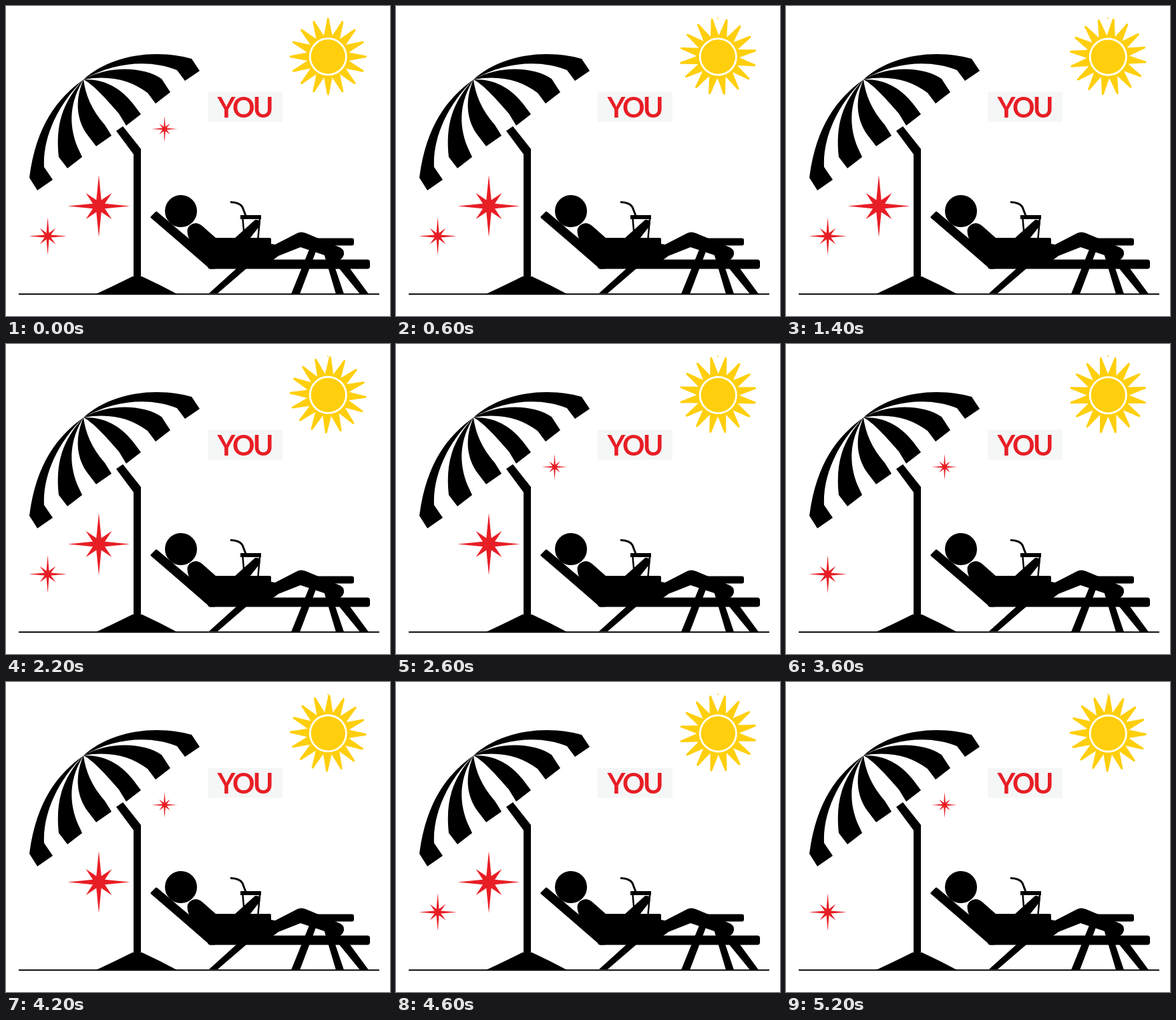
Animation, 575 px wide and 464 px high, one loop 5400 ms. Source, as an HTML page:

```html
<!DOCTYPE html>
<html lang="en">
<head>
<meta charset="utf-8">
<title>You on the beach</title>
<style>
html, body { margin: 0; width: 100%; height: 100%; overflow: hidden; background: #fff; }
svg { display: block; width: 575px; height: 464px; }
text { font: 700 41.5px Lato, sans-serif; letter-spacing: -2.7px; fill: #e81e25; }
</style>
</head>
<body>
<svg viewBox="0 0 575 464">
  <g id="parasol">
    <path d="M116 110C77 138 45 179 35 257L47 276 70 260 57 241C55 198 76 149 116 110Z"/>
    <path d="M116 110C84 145 74 178 79 226L92 243 114 226 107 211C93 176 96 143 116 110Z"/>
    <path d="M116 110C101 145 108 174 122 193L135 210 158 194 148 178C128 155 119 133 116 110Z"/>
    <path d="M116 110C132 118 156 146 169 161L180 179 202 162 190 146C170 121 146 109 116 110Z"/>
    <path d="M116 110C155 88 207 91 233 109L246 129 224 146 212 130C187 111 155 103 116 110Z"/>
    <path d="M116 110C155 75 219 63 278 79L290 97 268 112 256 96C216 80 164 83 116 110Z"/>
    <path d="M165 187L175 180 202 214V404H191V222Z"/>
    <path d="M135 431Q165 417 189 405 196 402 204 405 230 417 256 431Z"/>
  </g>
  <path d="M19 431.2H559" stroke="#000" stroke-width="2"/>

  <g id="lounger">
    <path d="M218 316L225 309 312 382V392H306Z" stroke="#000" stroke-width="3" stroke-linejoin="round"/>
    <rect x="302" y="379.5" width="243" height="14" rx="4"/>
    <path d="M345 393H360L317 430H304Z"/>
    <path d="M499 393H515L543 431H530Z"/>
    <rect x="448" y="347.5" width="73" height="11" rx="3"/>
    <path d="M457 357H468L440 431H427Z"/>
    <path d="M472 357H481L506 431H494Z"/>
  </g>

  <g id="person">
    <circle cx="262" cy="307" r="24"/>
    <path d="M276 353Q264 328 284 325 290 325 297 332L314 347H395Q397 347 397 349V356L403 357 436 340Q442 337 449 340L497 360Q507 363 506 372 503 382 492 381 487 380 486 376L441 361 408 374 400 380 396 388H308Z"/>
    <path d="M342 348L373 320Q383 319 380 329L365 348Z"/>
  </g>

  <g id="drink" fill="none" stroke="#000">
    <path d="M336 293.5Q350 294 354 301L359 314" stroke-width="3"/>
    <path d="M354.5 319L357 347M380 319L377.5 347" stroke-width="2.5"/>
    <path d="M351 316H382" stroke-width="6"/>
  </g>

  <rect x="302" y="128.5" width="112" height="45" fill="#f5f7f7"/>
  <text x="316.5" y="167">YOU</text>

  <g fill="#ffcf0d">
    <circle cx="482" cy="18.5" r="1"/>
    <g id="sun">
      <circle r="25.7"/>
      <circle r="30" fill="none" stroke="#ffcf0d" stroke-width="3"/>
    </g>
  </g>
  <g id="stars" fill="#e81e25"></g>
</svg>
<script>
const STEP = 200, STEPS = 27, TURN = 4.37, SINK = 0.05, RAYS = 16;
const sun = document.getElementById('sun');
const stars = document.getElementById('stars');

function addPath(parent, d, transform = '') {
  const path = document.createElementNS('http://www.w3.org/2000/svg', 'path');
  path.setAttribute('d', d);
  path.setAttribute('transform', transform);
  return parent.appendChild(path);
}

for (let i = 0; i < RAYS; i++) {
  addPath(sun, 'M-6.5-30Q-3.7-44-1.5-56.5Q0-59.3 1.5-56.5Q3.7-44 6.5-30Z', `rotate(${i * 360 / RAYS})`);
}

// Eight points: long on the axes, short on the diagonals.
function addStar(x, y, size, inner) {
  const points = Array.from({ length: 16 }, (_, i) => {
    const r = size * (i % 2 ? inner : i % 4 ? 0.59 : 1);
    const a = i * Math.PI / 8;
    return [x + r * Math.cos(a), y + r * Math.sin(a)].map(v => v.toFixed(2));
  });
  return addPath(stars, `M${points.join('L')}Z`);
}

const blinkers = [
  addStar(62.5, 344.5, 28.5, 0.18),
  addStar(139, 299.5, 46.5, 0.21),
  addStar(237.5, 184, 19.5, 0.18)
];

function draw(now) {
  const step = Math.floor(now / STEP) % STEPS;
  // The sun turns slowly and sinks a little.
  sun.setAttribute('transform', `translate(482.3 ${75.8 + step * SINK}) rotate(${step * TURN})`);
  // Each beat hides the next star; every fourth shows them all.
  blinkers.forEach((star, i) => {
    star.style.visibility = step % 4 === i + 1 ? 'hidden' : 'visible';
  });
}

let start;
function tick(now) {
  start ??= now;
  draw(now - start);
  requestAnimationFrame(tick);
}
draw(0);
requestAnimationFrame(tick);
</script>
</body>
</html>
```
